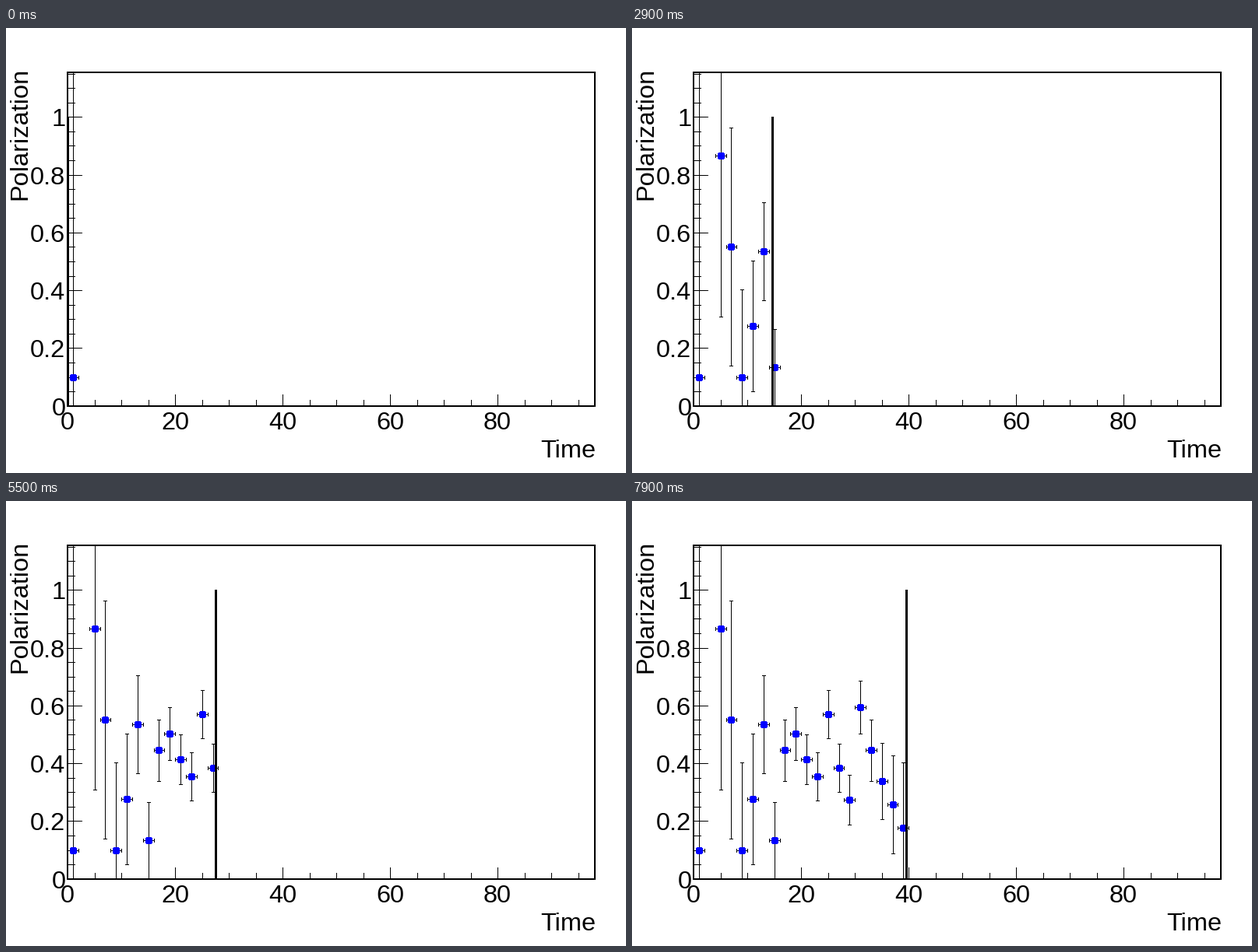
These frames come from a looping animation (796x572 px, 8000 ms). A matplotlib script:

```python
import matplotlib.pyplot as plt
from matplotlib.animation import FuncAnimation
from matplotlib.patches import Circle, Rectangle

W, H, DPI = 796, 572, 100
FRAMES, INTERVAL = 80, 100
LEFT, RIGHT, TOP, BOTTOM = 79.6, 756.2, 57.2, 486.2
X_MAX, Y_MAX = 98, 1.155
FONT_PX = 32.5

# the bin around time 3 holds no data
TIMES = [1, *range(5, 40, 2)]
VALUES = [.099, .866, .551, .099, .277, .535, .134, .446, .503, .414,
          .355, .570, .384, .274, .594, .446, .338, .258, .177]

plt.rcParams["font.family"] = "Liberation Sans"
plt.rcParams["toolbar"] = "None"
fig = plt.figure(figsize=(W / DPI, H / DPI), dpi=DPI, facecolor="white")
ax = fig.add_axes([0, 0, 1, 1])
ax.set_xlim(0, W)
ax.set_ylim(H, 0)
ax.axis("off")


def px(t):
    return int(LEFT + t * (RIGHT - LEFT) / X_MAX)


def py(v):
    return int(BOTTOM - v * (BOTTOM - TOP) / Y_MAX)


def error(t):
    """Error bars are shortest at time 25 and grow evenly to both sides."""
    s = abs(t - 25) / 10
    return 0.0827 + 0.0485 * s**3.2 + 2.8e-5 * s**10


def block(x0, y0, x1, y1, z=2):
    """Fill the pixels from (x0, y0) to (x1, y1), ends included."""
    return ax.add_patch(Rectangle((x0, y0), x1 - x0 + 1, y1 - y0 + 1,
                                  fc="black", lw=0, aa=False, zorder=z))


def label(x, y, s, **kw):
    ax.text(x, y, s, fontsize=FONT_PX * 72 / DPI, color="black",
            va="baseline", **kw)


def draw_axes():
    x0, x1, y0, y1 = int(LEFT), int(RIGHT), int(TOP), int(BOTTOM)
    for x in (x0, x1):
        block(x - 1, y0 - 1, x, y1)
    for y in (y0, y1):
        block(x0 - 1, y - 1, x1, y)
    for t in range(0, X_MAX, 5):
        x = px(t)
        major = t % 20 == 0
        block(x, y1 - (15 if major else 8), x, y1)
        if major:
            label(x, 516.5, str(t), ha="center")
    for i in range(24):
        y = py(i / 20)
        major = i % 4 == 0
        block(x0, y, x0 + (18 if major else 9), y)
        if major:
            label(76.3, y + 12.3, f"{i / 20:g}", ha="right")
    label(757, 552.5, "Time", ha="right")
    label(26.3, 50.3, "Polarization", ha="right", rotation=90,
          rotation_mode="anchor")


def draw_point(t, v):
    x, x0, x1, y = px(t), px(t - 1), px(t + 1), py(v)
    top, bottom = py(v + error(t)), py(v - error(t))
    parts = [block(x, max(top, int(TOP)), x, min(bottom, int(BOTTOM))),
             block(x0, y, x1, y)]
    parts += [block(c, y - 2, c, y + 2) for c in (x0, x1)]
    parts += [block(x - 2, c, x + 2, c) for c in (top, bottom)
              if TOP < c < BOTTOM]
    parts.append(ax.add_patch(Circle((x + 0.5, y + 0.5), 4.3, fc="#0000ff",
                                     lw=0, aa=False, snap=False, zorder=3)))
    return parts


draw_axes()
points = [(t, draw_point(t, v)) for t, v in zip(TIMES, VALUES)]
cursor = block(0, py(1), 2, int(BOTTOM) - 1, z=4)


def update(i):
    now = i / 2
    cursor.set_x(px(now + 0.05) - 1)
    for t, parts in points:
        for part in parts:
            part.set_visible(t - 1 <= now)
    return [cursor]


anim = FuncAnimation(fig, update, frames=FRAMES, interval=INTERVAL,
                     repeat=True, repeat_delay=0, blit=False)
plt.show()
```
